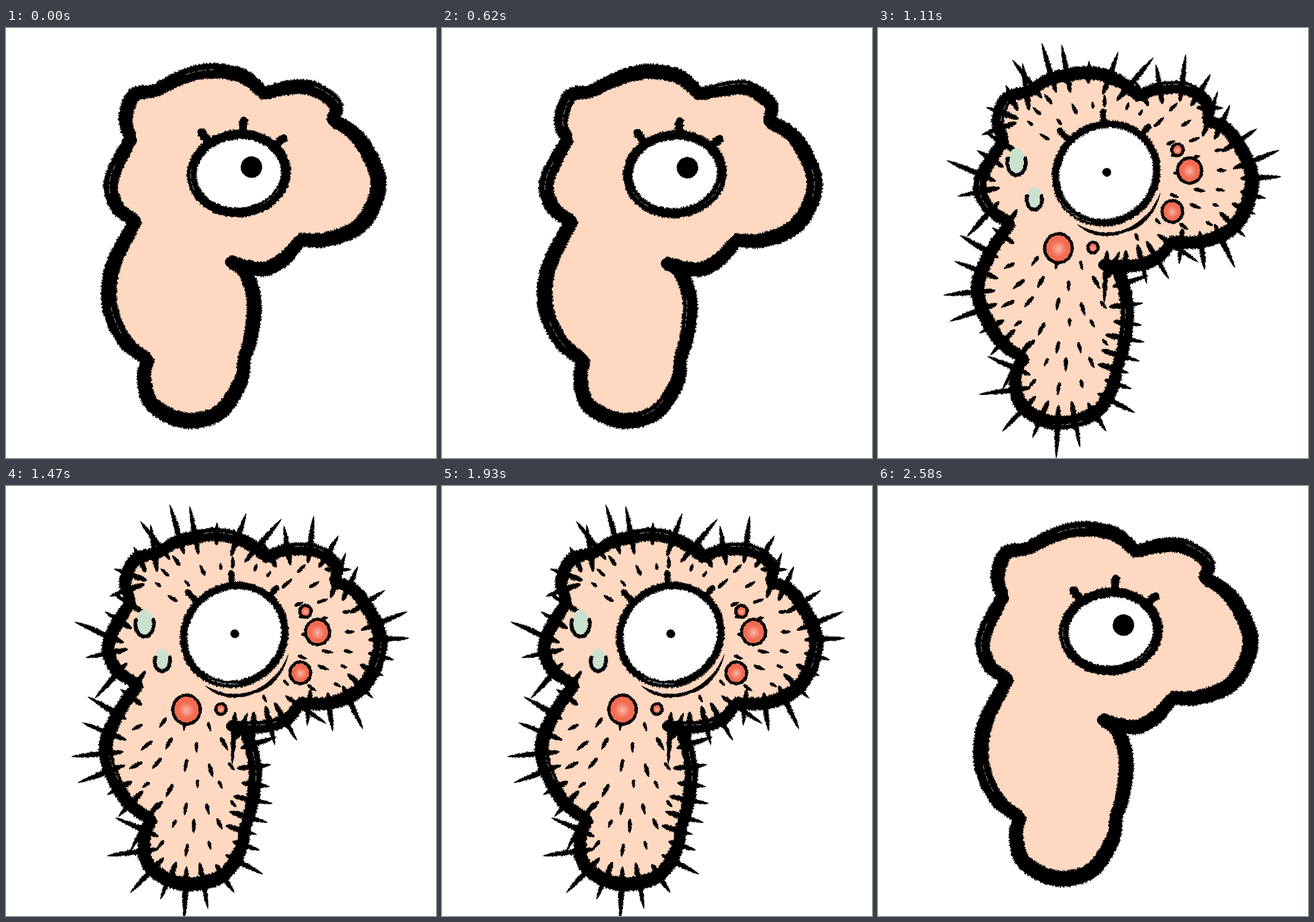
An HTML page with a canvas that plays this animation: 748x748 px, repeating every 2710 ms.

```html
<!DOCTYPE html>
<html>
<head>
<meta charset="utf-8">
<style>
html, body { margin: 0; height: 100%; overflow: hidden; background: #fff; }
canvas { display: block; width: 100vw; height: 100vh; }
</style>
</head>
<body>
<canvas id="stage" width="748" height="748"></canvas>
<script>
const ctx = document.getElementById('stage').getContext('2d');
const TAU = Math.PI * 2;
const mix = (a, b, t) => a + (b - a) * t;

// Key points of each lobe; a lobe starts where the one before it ends
const lobes = text => text.split('/').map(l => l.trim().split(/\s+/).map(p => p.split(',').map(Number)));
const PLAIN = lobes(`316,83 362,75 412,83 450,115 / 482,106 530,104 572,132 568,160 /
  615,193 648,268 620,338 560,368 512,368 / 482,402 445,420 389,408 /
  415,424 432,470 428,530 414,575 / 408,615 372,668 312,682 255,655 240,610 246,577 /
  206,545 181,485 186,415 226,335 / 194,312 183,265 218,192 / 207,160 222,118 258,110`);
const BUSHY = lobes(`300,90 365,78 415,90 455,120 / 485,106 535,105 573,130 573,162 /
  612,182 651,260 625,338 570,370 511,371 / 490,398 450,413 391,412 /
  418,425 434,485 428,545 414,595 / 408,625 375,672 305,686 250,655 240,605 254,574 /
  208,540 174,462 190,400 230,340 / 190,310 179,265 218,195 / 208,160 225,122 264,111`);
const PIMPLES = [[542, 248, 21], [512, 319, 18], [314, 383, 24], [374, 382, 9], [521, 212, 10]];

let seed = 1;
const rnd = () => (seed = seed * 16807 % 2147483647) / 2147483647;

// Catmull-Rom curve sampled about every pixel
function curve(pts) {
  const out = [];
  for (let i = 0; i < pts.length - 1; i++) {
    const b = pts[i], c = pts[i + 1], a = pts[i - 1] || b, d = pts[i + 2] || c;
    const n = Math.ceil(Math.hypot(c[0] - b[0], c[1] - b[1]));
    for (let k = 0; k < n; k++) {
      const t = k / n;
      out.push(b.map((v, j) => v + t / 2 * (c[j] - a[j] +
        t * (2 * a[j] - 5 * v + 4 * c[j] - d[j] + t * (3 * (v - c[j]) + d[j] - a[j])))));
    }
  }
  return [...out, pts.at(-1)];
}

function arc(x, y, rx, ry, from, to, tilt = 0) {
  const n = Math.ceil(Math.abs(to - from) * Math.max(rx, ry)), c = Math.cos(tilt), s = Math.sin(tilt);
  return Array.from({ length: n + 1 }, (_, i) => {
    const a = mix(from, to, i / n), u = rx * Math.cos(a), v = ry * Math.sin(a);
    return [x + u * c - v * s, y + u * s + v * c];
  });
}

function outline(stage, drop) {
  const shape = PLAIN.map((lobe, i) => lobe.map((p, j) => p.map((v, k) =>
    mix(v, BUSHY[i][j][k], stage) + (rnd() - .5) * 2 + k * drop)));
  return shape.map((lobe, i) => curve([shape.at(i - 1).at(-1), ...lobe]));
}

function pathOf(pts) {
  const path = new Path2D();
  pts.forEach(p => path.lineTo(...p));
  return path;
}

function fill(pts, color) {
  ctx.fillStyle = color;
  ctx.fill(pathOf(pts));
}

// Unit normal to the left of the path, which is outward on the outline
function normal(pts, i) {
  const a = pts[Math.max(0, i - 2)], b = pts[Math.min(pts.length - 1, i + 2)];
  const len = Math.hypot(b[0] - a[0], b[1] - a[1]) || 1;
  return [(b[1] - a[1]) / len, (a[0] - b[0]) / len];
}

const thick = t => .76 + .24 * Math.sqrt(Math.sin(Math.PI * t));
const hairy = t => Math.sin(Math.PI * t ** .75) ** .8;
const even = () => 1;

// Crayon line: a solid core with short slanted bristles along both edges
function ink(pts, width, shape) {
  ctx.strokeStyle = '#000';
  ctx.lineCap = 'round';
  const fuzz = new Path2D();
  pts.forEach(([x, y], i) => {
    const half = width / 2 * (shape(i / (pts.length - 1)) || 0), [nx, ny] = normal(pts, i);
    const reach = () => half + (rnd() - .55) * Math.min(4.5, half * .8);
    const r = reach(), q = reach(), slant = half * .35;
    fuzz.moveTo(x + nx * r + ny * slant, y + ny * r - nx * slant);
    fuzz.lineTo(x - nx * q - ny * slant, y - ny * q + nx * slant);
    if (!i) return;
    ctx.beginPath();
    ctx.moveTo(...pts[i - 1]);
    ctx.lineTo(x, y);
    ctx.lineWidth = Math.max(.5, half * 2 - 2);
    ctx.stroke();
  });
  ctx.lineCap = 'butt';
  ctx.lineWidth = 1.5;
  ctx.stroke(fuzz);
}

// Thin dry gap left by the crayon
function scratch(pts, width) {
  const from = Math.floor(pts.length * (.15 + rnd() * .4)), off = (rnd() - .5) * width * .6;
  const gap = pts.slice(from, from + 50).map(([x, y], i) => {
    const [nx, ny] = normal(pts, from + i);
    return [x + nx * off, y + ny * off];
  });
  ctx.setLineDash([9, 3, 4, 5]);
  ctx.strokeStyle = '#fff';
  ctx.lineWidth = .8;
  ctx.stroke(pathOf(gap));
  ctx.setLineDash([]);
}

// Hairs stand on the outline, fan out around the eye and hang down the leg
function plantHairs() {
  const edge = outline(1, 0).flat(), skin = pathOf(edge), hairs = [];
  const inside = (x, y) => ctx.isPointInPath(skin, x, y);
  const add = (x, y, dx, dy, back, ahead) =>
    hairs.push([[x - dx * back, y - dy * back], [x + dx * ahead, y + dy * ahead]]);

  for (let i = 14; i < edge.length; i += 26 + rnd() * 14) {
    const at = Math.floor(i), [x, y] = edge[at], [nx, ny] = normal(edge, at);
    add(x, y, nx, ny, 16 + rnd() * 20, 20 + 48 * rnd() ** 1.4);
  }
  for (let r = 122; r < 230; r += 38) {
    for (let a = -2.6; a < 1.2; a += 32 / r) {
      const t = a + (rnd() - .5) * .12, c = Math.cos(t), s = Math.sin(t);
      if (inside(398 + c * (r + 28), 253 + s * (r + 28))) add(398 + c * r, 253 + s * r, c, s, 6, 4 + rnd() * 14);
    }
  }
  for (let y = 400, row = 0; y < 650; y += 36, row++) {
    for (let x = 222 + row % 2 * 20; x < 410; x += 42) {
      const u = x + rnd() * 10, v = y + rnd() * 14, t = Math.PI / 2 + (328 - u) * .011;
      if (inside(u - 24, v) && inside(u + 24, v + 20)) add(u, v, Math.cos(t), Math.sin(t), 9, 5 + rnd() * 14);
    }
  }
  return hairs;
}

function body(stage, drop) {
  const shape = outline(stage, drop), width = mix(26, 23, Math.min(1, stage * 1.6));
  fill(shape.flat(), '#fed8c0');
  const weight = lobe => width * (.88 + lobe.length / 2000);
  shape.forEach(lobe => ink(lobe, weight(lobe), thick));
  shape.forEach(lobe => { if (rnd() < .6) scratch(lobe, weight(lobe)); });
}

function hair([[x, y], [u, v]], grow, drop) {
  const at = t => [mix(x, u, t), mix(y, v, t) + drop];
  const width = Math.min(9.5, 4.5 + Math.hypot(u - x, v - y) * .1) * mix(.45, 1, grow);
  ink(curve([at(.3 * (1 - grow)), at(mix(.3, 1, grow))]), width, hairy);
}

function pimple(x, y, size, grow) {
  const r = size * mix(.1, 1, grow), glow = ctx.createRadialGradient(x, y + 1, 0, x, y + 1, r * .6);
  glow.addColorStop(0, '#f9bdb0');
  glow.addColorStop(.35, '#f69a87');
  glow.addColorStop(1, '#f26b52');
  const rim = arc(x, y, r, r * 1.05, 0, TAU);
  fill(rim, size < 12 && grow < .5 ? '#fff' : glow);
  ink(rim, Math.min(5, r * .55), even);
}

function slime(x, y, scale, grow) {
  const rx = 15 * scale * Math.min(1, grow * 2.5), ry = mix(4, 22, grow) * scale;
  fill(arc(x, y - 1, rx, ry, 0, TAU), '#cbe1cf');
  ink(arc(x, y + 2, rx + 1, ry, -.4, Math.PI + .4), 6 * Math.min(1, .5 + grow), even);
}

function eye(stage, drop) {
  const x = mix(405, 397, stage), y = 253 + drop, rx = mix(82, 90, stage), ry = mix(68, 84, stage);
  const ring = arc(x, y, rx, ry, -.6, TAU - .6, -.1 - .5 * stage), width = mix(16, 12, stage);
  fill(ring, '#fff');
  ink(ring, width, even);
  scratch(ring, width);
  scratch(ring, width);

  const pupil = arc(mix(427, 398, stage), mix(242, 251, stage) + drop, 1, 1, 0, TAU)[0];
  const pr = 18 - 11 * stage ** 3;
  const dot = arc(pupil[0] - 1, pupil[1], pr - 1, pr - 1, 0, TAU);
  fill(dot, '#000');
  ink(dot, 3, even);

  for (let i = 0; i < 3; i++) {
    const a = -2.25 + i * .76 - .13 * stage, c = Math.cos(a), s = Math.sin(a);
    const root = [x + c * rx, y + s * ry];
    ink(curve([root, [root[0] + c * 23, root[1] + s * 25]]), mix(14, 10, stage), even);
  }
}

function wrinkles(stage, grow, drop) {
  const size = mix(.86, 1, stage), less = 1 - grow;
  const fold = (rx, ry, from, to) => {
    const a = mix(from, to, .57 * less), b = mix(to, from, .54 * less);
    ink(arc(398, 253 + drop, rx * size, ry * size, a, b), mix(3, 6, grow), hairy);
  };
  fold(93, 106, 2.15, .75);
  fold(98, 108, 1.2, .32);
}

const HAIRS = plantHairs();

function draw(stage, drop, look) {
  const grow = stage ** 1.5;
  seed = look * 7919;
  ctx.fillStyle = '#fff';
  ctx.fillRect(0, 0, 748, 748);
  body(stage, drop);
  if (stage) {
    HAIRS.forEach(h => hair(h, grow, drop));
    slime(241, mix(208, 232, grow) + drop, 1, grow);
    slime(272, mix(278, 296, grow) + drop, .82, grow);
    PIMPLES.forEach(([x, y, r]) => pimple(x, y + drop, r, grow));
    wrinkles(stage, grow, drop);
  }
  eye(stage, drop);
}

// Each pose: how far the hair has come, how low the body hangs
const POSES = { A: [0, 0], B: [0, 1], x: [.25, 0], C: [.5, 0], y: [.78, 0], D: [1, 0], E: [1, 6] };
const ORDER = 'ABABABxCyDEDEDEDEyCxBA';
const QUICK = [3, 5, 10, 12, 14];
const LOOP = 2710;

function poseAt(time) {
  let i = 0;
  while (i < ORDER.length - 1 && (time -= QUICK.includes(i) ? 100 : 130) >= 0) i++;
  return ORDER[i];
}

let begin, shown;
function tick(now) {
  begin ??= now;
  const name = poseAt((now - begin) % LOOP);
  if (name !== shown) draw(...POSES[name], name.charCodeAt(0));
  shown = name;
  requestAnimationFrame(tick);
}
requestAnimationFrame(tick);
</script>
</body>
</html>
```
